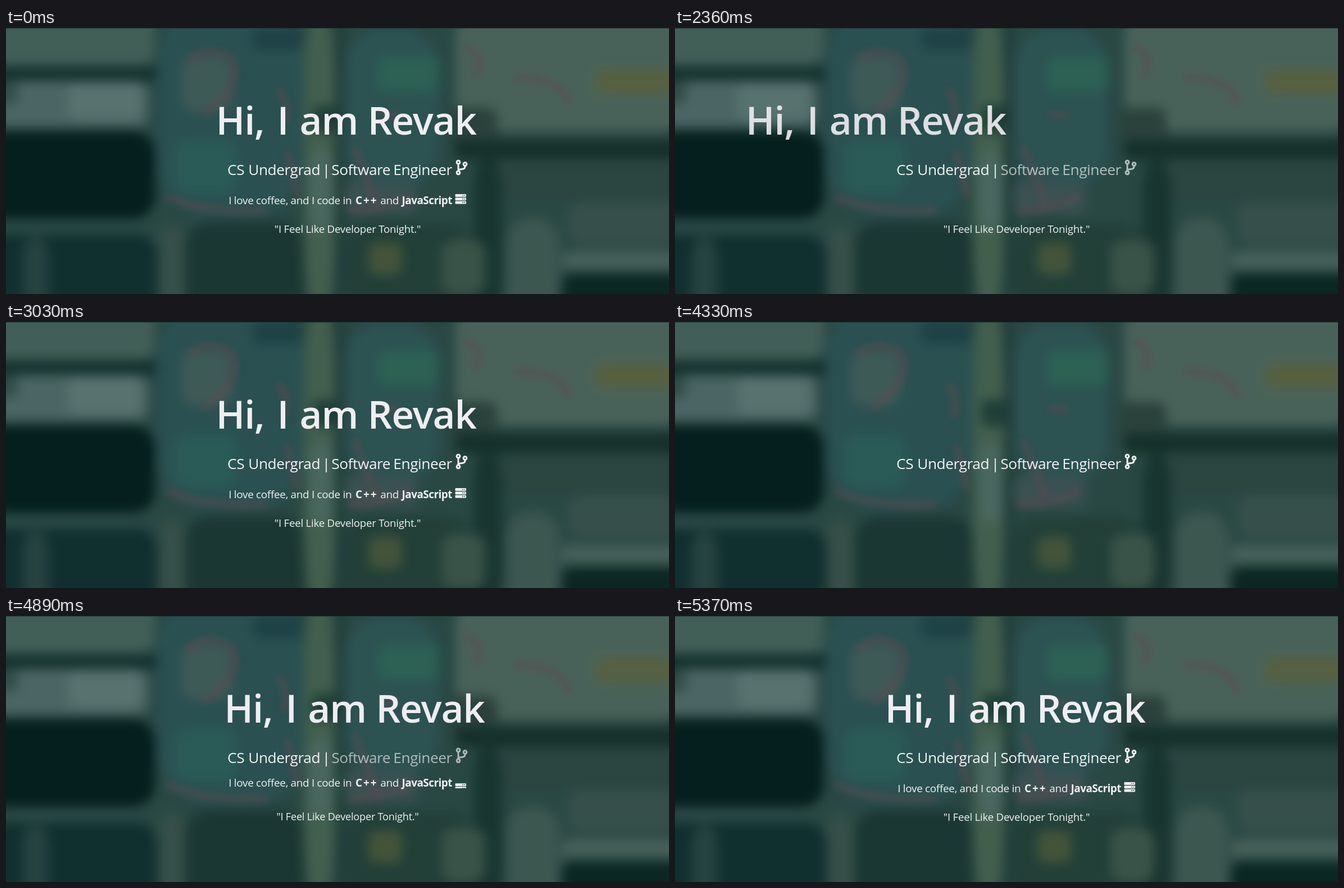
Animation, 1180 px wide and 474 px high, one loop 8360 ms. Source, as an HTML page:

```html
<!DOCTYPE html>
<html lang="en">
<head>
<meta charset="utf-8">
<title>Intro banner</title>
<style>
  html, body { margin: 0; width: 100%; height: 100%; overflow: hidden; background: #2a4845; }
  svg { position: absolute; left: 0; top: 0; width: 1180px; height: 474px; }
  #wall { will-change: transform; }
  text { font-family: "Open Sans", "Noto Sans", sans-serif; fill: #f1f3f3; }
  #title { font-size: 69px; font-weight: 600; letter-spacing: -1.1px; fill: #efeef2; }
  .role { font-size: 26.3px; letter-spacing: -.45px; }
  .code { font-size: 18.9px; letter-spacing: -.3px; }
  .code .strong { font-weight: 700; letter-spacing: -.5px; }
  .code .wide { letter-spacing: 2px; }
  #quote { font-size: 18.6px; letter-spacing: -.2px; text-anchor: middle; }
</style>
</head>
<body>
<svg id="wall" viewBox="0 0 1180 474">
  <defs>
    <filter id="soft" filterUnits="userSpaceOnUse" x="-40" y="-40" width="1260" height="554" color-interpolation-filters="sRGB">
      <feGaussianBlur stdDeviation="10"/>
    </filter>
    <filter id="haze" filterUnits="userSpaceOnUse" x="0" y="0" width="1180" height="474" color-interpolation-filters="sRGB">
      <feGaussianBlur stdDeviation="6"/>
    </filter>
  </defs>
  <g id="blocks" filter="url(#soft)"></g>
  <g filter="url(#haze)" fill="none" stroke="#5e4a50" stroke-width="13" opacity=".5">
    <path d="M325 60q30-30 75-5q25 50-50 98M484 110q24 25 10 60M500 220l20 80M620 210l40 105M905 88q90 0 95 48M815 35q40 10 20 50M285 300q60 30 180 25M665 155h35M610 325q60 0 110-25"/>
  </g>
  <path d="M0 .5H1180" stroke="#122b28" stroke-opacity=".6"/>
</svg>

<svg viewBox="0 0 1180 474">
  <defs>
    <clipPath id="slot"><rect id="window" x="795" y="290" width="30" height="24"/></clipPath>
  </defs>
  <text id="title" y="190"><tspan x="373.5">Hi,</tspan><tspan x="482.5">I</tspan><tspan x="522.5">am</tspan><tspan x="643.5">Revak</tspan></text>

  <text class="role" y="262"><tspan x="394">CS</tspan><tspan x="431.2">Undergrad</tspan><tspan x="562.7">|</tspan></text>
  <g id="flash">
    <text class="role" y="262"><tspan x="579.2">Software</tspan><tspan x="689.3">Engineer</tspan></text>
    <g fill="none" stroke="#f1f3f3" stroke-width="3">
      <circle cx="805" cy="239.2" r="2.9"/>
      <circle cx="805" cy="257.8" r="2.9"/>
      <circle cx="817" cy="242.6" r="2.9"/>
      <path d="M805 242v13M817 245.500v1q0 4-4 4.700l-5 .8q-3 .5-3 3"/>
    </g>
  </g>

  <text id="code" class="code" y="314"><tspan x="396.2">I love coffee, and I code in</tspan><tspan class="strong wide" x="622">C++</tspan><tspan x="666.2">and</tspan><tspan class="strong" x="704.5">JavaScript</tspan></text>
  <g clip-path="url(#slot)"><g id="server" fill="#f1f3f3" fill-rule="evenodd"></g></g>

  <text id="quote" y="6.500">"I Feel Like Developer Tonight."</text>
</svg>

<script>
const LOOP = 8360;
const $ = id => document.getElementById(id);
const set = (id, attrs) => {
  for (const k in attrs) $(id).setAttribute(k, attrs[k]);
};

// Blurred wall: x y width height colour
const blocks = `
-40 -40 1260 554 #294844
-40 -40 305 106 #415e57
-40 70 308 24 #12302d
-40 94 294 82 #4a6563
-40 94 60 40 #2f4d49
110 100 130 64 #587270
-40 184 305 156 #041f1d
-40 346 265 16 #2a4a47
-40 368 310 146 #10302f
30 372 45 142 #264340
270 -40 260 375 #2a5051
440 0 85 38 #1d4145
312 50 90 100 #3e5a57
300 200 110 95 #2a5b57
320 346 210 168 #1b3733
270 350 48 164 #364f48
530 -40 56 554 #425f4e
540 215 42 145 #49675f
545 138 45 48 #1f3f38
587 -40 14 554 #1d3a37
601 0 170 285 #2c5252
601 275 130 55 #3b5152
660 50 110 65 #2c6154
605 348 225 166 #223f38
800 -40 420 224 #496259
1050 75 170 42 #57603f
790 142 85 70 #2a423b
800 198 420 36 #15302a
832 225 52 289 #183530
885 240 335 65 #2b4541
890 338 95 176 #3c5650
1000 310 220 75 #364f4b
990 398 230 32 #466059
990 438 230 76 #0b2724
645 382 60 58 #43543a
775 378 78 96 #3a5348`;

$("blocks").innerHTML = blocks.trim().split("\n").map(row => {
  const [x, y, w, h, fill] = row.split(" ");
  return `<rect x="${x}" y="${y}" width="${w}" height="${h}" rx="${h / 4}" fill="${fill}"/>`;
}).join("");

const bar = "M1.200 0h17.100q1.200 0 1.200 1.200v2.600q0 1.200-1.200 1.200h-17.100q-1.200 0-1.200-1.200v-2.600q0-1.200 1.200-1.200z" +
  "M12.800 1.700v1.600h1.600v-1.600zM16 1.700v1.600h1.600v-1.600z";
$("server").innerHTML = [0, 1, 2].map(i =>
  `<path transform="translate(0 ${i * 6.2})" d="${bar}"/>`).join("");

function bezier(x1, y1, x2, y2) {
  const at = (a, b, s) => 3 * (1 - s) * (1 - s) * s * a + 3 * (1 - s) * s * s * b + s * s * s;
  return x => {
    let lo = 0, hi = 1;
    for (let i = 0; i < 24; i++) {
      const mid = (lo + hi) / 2;
      if (at(x1, x2, mid) < x) lo = mid; else hi = mid;
    }
    return at(y1, y2, lo);
  };
}
const bounceEase = bezier(.215, .61, .355, 1);
const plainEase = bezier(.25, .1, .25, 1);

// Each interval between keys is eased on its own.
function track(keys, p, ease) {
  if (p <= 0) return keys[0][1];
  for (let i = 1; i < keys.length; i++) {
    const [a, from] = keys[i - 1], [b, to] = keys[i];
    if (p < b) return from + (to - from) * ease((p - a) / (b - a));
  }
  return keys[keys.length - 1][1];
}

const FADE = [[0, 0], [.6, 1]];
const LEFT = [[0, -3000], [.6, 25], [.75, -10], [.9, 5], [1, 0]];
const UP = [[0, 3000], [.6, -20], [.75, 10], [.9, -5], [1, 0]];
const POP = [[0, .3], [.2, 1.1], [.4, .9], [.6, 1.03], [.8, .97], [1, 1]];
const FLASH = [[0, 1], [.25, 0], [.5, 1], [.75, 0], [1, 1]];

function draw(t) {
  const start = t < 1930 ? -LOOP : t < 4330 ? 2025 : 4351;
  const ms = t - start;
  const p = ms / 1000;
  const pop = (ms + 21) / 750;
  const fade = track(FADE, p, bounceEase);

  set("title", { transform: `translate(${track(LEFT, p, bounceEase)} 0)`, opacity: fade });
  set("flash", { opacity: track(FLASH, (ms + 15) / 1000, plainEase) });

  const dy = track(UP, p, bounceEase);
  set("code", { transform: `translate(0 ${dy})`, opacity: fade });

  // The icon rises inside its own clipped slot.
  const shift = dy < 0 ? -dy * .22 : dy * .78;
  set("server", { transform: `translate(799.5 ${296 + shift})`, opacity: fade });
  set("window", { height: 24 + Math.min(dy, 0) * .72 });

  set("quote", {
    transform: `translate(608 358) scale(${track(POP, pop, bounceEase)})`,
    opacity: track(FADE, pop, bounceEase)
  });
}

function tick() {
  draw(performance.now() % LOOP);
  requestAnimationFrame(tick);
}
tick();
</script>
</body>
</html>
```
